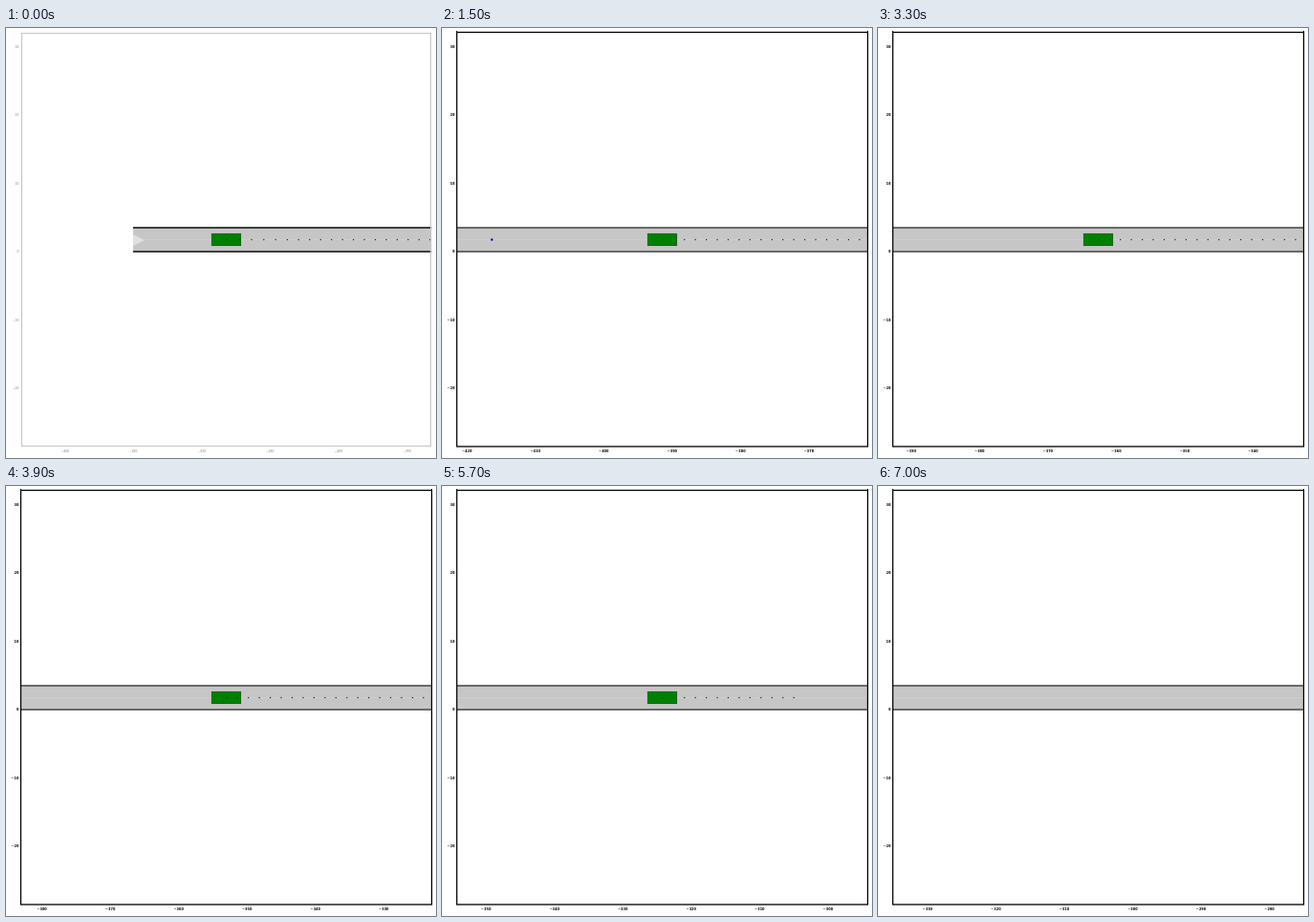
An HTML page with a canvas that plays this animation: 450 by 450 pixels, repeating every 7.5 s.

```html
<!DOCTYPE html>
<html lang="en">
<head>
<meta charset="utf-8">
<title>Car on a straight lane</title>
<style>
html, body { margin: 0; width: 100%; height: 100%; overflow: hidden; background: #fff; }
canvas { display: block; width: 450px; height: 450px; }
</style>
</head>
<body>
<canvas id="stage" width="450" height="450"></canvas>
<script>
const ctx = document.getElementById('stage').getContext('2d');
const LOOP = 7500, STEP = 100, LAST_STEP = 70, END_POINT = 69;
const LEFT = 15.5, RIGHT = 445.5, TOP = 4.5, BOTTOM = 438;
const CAR_X = 230.8, LANE_Y = 221.5, TICK = 71.55;
const LANE_START = 133;

// Distance covered after n steps: slows down briefly, then stays constant.
function distance(n) {
  return n <= 7 ? 13.41 * n - 0.14 * n * n : 87 + 11.45 * (n - 7);
}

function rect(x, y, w, h, color) {
  ctx.fillStyle = color;
  ctx.fillRect(x, y, w, h);
}

function label(value, x, y, align, faint) {
  ctx.save();
  ctx.translate(x, y);
  ctx.scale(0.1, 0.1);
  ctx.font = (faint ? '30px' : 'bold 35px') + ' "DejaVu Sans", sans-serif';
  ctx.textAlign = align;
  ctx.textBaseline = 'alphabetic';
  ctx.fillStyle = faint ? 'rgba(0,0,0,0.5)' : '#000';
  ctx.fillText(String(value).replace('-', '\u2212'), 0, 13);
  ctx.restore();
}

function drawLane(shift, first) {
  const start = LANE_START - shift;
  const x = Math.max(LEFT, start);
  rect(x, 208.5, RIGHT - x, 26, '#c6c6c6');
  rect(x, 221, RIGHT - x, 1, '#cecece');
  if (start > LEFT - 12) {
    ctx.fillStyle = '#e0e0e0';
    ctx.beginPath();
    ctx.moveTo(start, 216);
    ctx.lineTo(start + 12, 222);
    ctx.lineTo(start, 228);
    ctx.fill();
  }
  const weight = first ? 1.8 : 1.3;
  for (const y of [209, 234]) rect(x, y - weight / 2, RIGHT - x, weight, '#303030');
}

function drawCar(step, shift) {
  rect(215, 215, 31, 13, '#008000');
  ctx.strokeStyle = 'rgba(0,50,0,0.45)';
  ctx.lineWidth = 0.6;
  ctx.strokeRect(215.2, 215.2, 30.6, 12.6);
  for (let n = step; n <= END_POINT; n++) {
    const x = CAR_X + distance(n) - shift;
    if (x > RIGHT) break;
    rect(x - 0.6, LANE_Y - 0.6, 1.2, 1.2, '#222');
  }
}

function drawAxes(shift, first) {
  if (first) {
    ctx.strokeStyle = '#c4c4c4';
    ctx.lineWidth = 1;
    ctx.strokeRect(16.5, 5.5, 428, 432);
  } else {
    ctx.strokeStyle = '#000';
    ctx.lineWidth = 1.3;
    ctx.strokeRect(LEFT, TOP, RIGHT - LEFT, BOTTOM - TOP);
    rect(15, 3, 1, 1, '#000');
    rect(445, 3, 1, 1, '#000');
  }
  for (let i = 0; i < 6; i++) label(30 - 10 * i, 13.4, 19.5 + 71.5 * i, 'right', first);
  const k0 = Math.ceil((LEFT - LANE_START + shift) / TICK);
  for (let k = k0; ; k++) {
    const x = LANE_START + 0.3 + k * TICK - shift;
    if (x > RIGHT) break;
    label(-430 + 10 * k, x, 442.4, 'center', first);
  }
}

function draw(time) {
  const step = Math.min(LAST_STEP, Math.floor((time % LOOP) / STEP));
  const first = step === 0;
  const shift = distance(Math.min(step, END_POINT));
  rect(0, 0, 450, 450, '#fff');
  ctx.save();
  ctx.beginPath();
  ctx.rect(LEFT, TOP, RIGHT - LEFT, BOTTOM - TOP);
  ctx.clip();
  drawLane(shift, first);
  ctx.fillStyle = '#1010a0';
  ctx.beginPath();
  ctx.arc(CAR_X - shift, LANE_Y, 1.2, 0, Math.PI * 2);
  ctx.fill();
  if (step <= END_POINT) drawCar(step, shift);
  ctx.restore();
  drawAxes(shift, first);
}

const origin = performance.now();
function tick() {
  draw(performance.now() - origin);
  requestAnimationFrame(tick);
}
tick();
</script>
</body>
</html>
```
